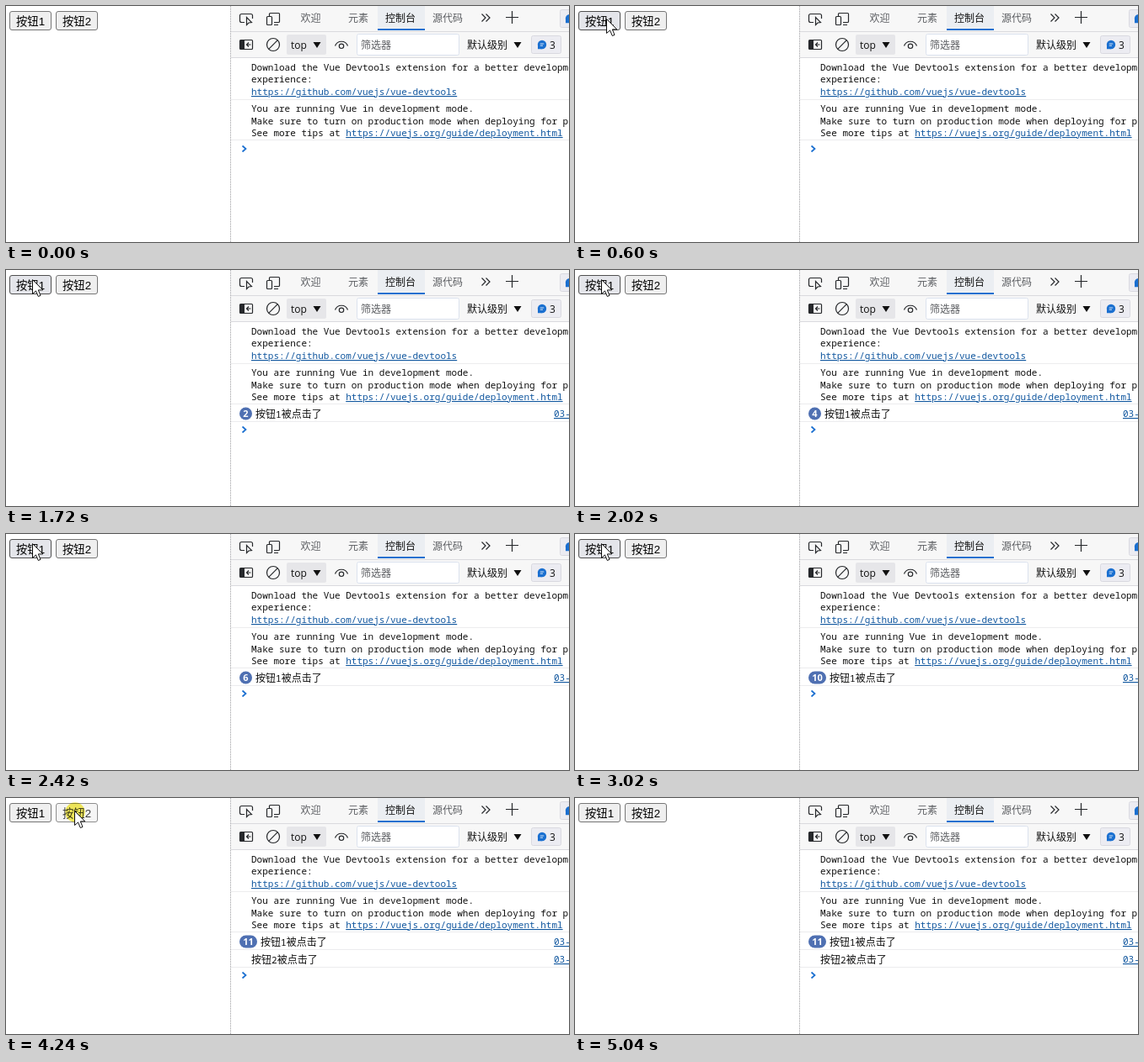
These frames come from a looping animation (668x281 px, 5.66 s). An HTML page:

```html
<!DOCTYPE html>
<html lang="zh-CN">
<head>
<meta charset="utf-8">
<title>Click counter</title>
<style>
html, body { margin: 0; width: 100%; height: 100%; overflow: hidden; background: #fff; }
svg { display: block; }
text { font: 12px "Open Sans", "Noto Sans CJK SC", "Noto Sans CJK", sans-serif; fill: #101010; white-space: pre; }
.mono, .mono text { font: 11px "Noto Sans Mono", "DejaVu Sans Mono", monospace; }
.cjk { font: 12px "Noto Sans CJK SC", "Noto Sans CJK", sans-serif; }
.dim { fill: #5c5e62; }
.link { fill: #11579f; text-decoration: underline; }
.icon { fill: none; stroke: #26282b; stroke-width: 1.2; }
.rule { stroke: #ececee; }
.btn rect { fill: #efefef; stroke: #767676; }
.btn text { font: 13.333px "Liberation Sans", "Noto Sans CJK SC", "Noto Sans CJK", sans-serif; fill: #000; }
.btn.hover rect { fill: #e4e5ea; stroke: #4f4f4f; }
.btn.active rect { fill: #f5f5f5; stroke: #8d8d8d; }
.btn.active text { fill: #3c3c3c; }
#badge text { font: bold 11px "Open Sans", sans-serif; fill: #fff; text-anchor: middle; }
#glow { fill: #f6ec3f; fill-opacity: .85; mix-blend-mode: multiply; }
</style>
</head>
<body>
<svg width="668" height="281" viewBox="0 0 668 281">
  <g class="btn" id="btn1"><rect x="4.5" y="6.5" width="49" height="22" rx="2.5"/><text x="12" y="22.5">按钮1</text></g>
  <g class="btn" id="btn2"><rect x="59.5" y="6.5" width="49" height="22" rx="2.5"/><text x="67" y="22.5">按钮2</text></g>

  <!-- Toolbars -->
  <rect x="267" width="401" height="62" fill="#f7f7f7"/>
  <path d="M266.5 0V281" stroke="#9a9a9e" stroke-dasharray="1 1"/>
  <path d="M267 30.5H668M267 61.5H668" stroke="#dadade"/>
  <rect x="441" width="56" height="29" fill="#ebeef2"/>
  <rect x="441" y="27" width="56" height="2" fill="#1a6fd0"/>
  <text class="dim cjk" x="349.5" y="18.5">欢迎</text>
  <text class="dim cjk" x="406" y="18.5">元素</text>
  <text class="cjk" x="450" y="18.5">控制台</text>
  <text class="dim cjk" x="506" y="18.5">源代码</text>
  <g class="icon">
    <path d="M283 19.5H279.5Q277.5 19.5 277.5 17.5V11.5Q277.5 9.5 279.5 9.5H290.5Q292.5 9.5 292.5 11.5V15"/>
    <path d="M285.5 13.5V22.5L288 20L291.5 19.5Z"/>
    <path d="M312.5 12V9.5Q312.5 8.5 313.5 8.5H323.5Q324.5 8.5 324.5 9.5V18.5Q324.5 19.5 323.5 19.5H318M318 22.5H323"/>
    <rect x="309.5" y="12.5" width="6" height="10" rx="1"/>
    <path d="M564.5 9.5L569 14L564.5 18.5M569.5 9.5L574 14L569.5 18.5"/>
    <path d="M593 13.5H608M600.5 6V21"/>
    <rect x="277.5" y="40.5" width="15" height="11" rx="1"/>
    <path d="M290.5 46H286M288 43.5L285.5 46L288 48.5"/>
    <circle cx="317" cy="46" r="7.5"/><path d="M311.7 51.3L322.3 40.7"/>
    <path d="M390.5 47.5C393 40.5 403 40.5 405.5 47.5"/><circle cx="398" cy="47.8" r="2.7"/>
  </g>
  <path d="M278 41H283V52H278Z" fill="#26282b"/>
  <rect x="333" y="34" width="47" height="24" rx="2" fill="#e6e6e9"/>
  <text x="338" y="51">top</text>
  <path d="M364.5 43H373.5L369 50ZM602.5 43H611.5L607 50Z" fill="#101010"/>
  <rect x="416.5" y="33.5" width="121" height="25" rx="2" fill="#fff" stroke="#dbe2ee"/>
  <text class="dim cjk" x="421" y="51">筛选器</text>
  <text class="cjk" x="547" y="51">默认级别</text>
  <g fill="#ececf2" stroke="#d9d9e0">
    <rect x="623.5" y="35.5" width="35" height="21" rx="2"/>
    <rect x="657.5" y="4.5" width="20" height="21" rx="2"/>
  </g>
  <g fill="#1a6fd0">
    <circle cx="636" cy="46" r="5.2"/><path d="M631 46V51.2H636Z"/>
    <circle cx="669" cy="15" r="5.2"/><path d="M664 15V20.2H669Z"/>
  </g>
  <path d="M633.8 45H638.2M633.8 47.2H637" stroke="#fff" stroke-width=".8"/>
  <text x="645" y="50.5">3</text>

  <!-- Console -->
  <g class="mono">
    <text x="291" y="77">Download the Vue Devtools extension for a better development</text>
    <text x="291" y="91">experience:</text>
    <text class="link" x="291" y="106">https://github.com/vuejs/vue-devtools</text>
    <text x="291" y="126">You are running Vue in development mode.</text>
    <text x="291" y="141">Make sure to turn on production mode when deploying for production.</text>
    <text x="291" y="155">See more tips at <tspan class="link">https://vuejs.org/guide/deployment.html</tspan></text>
  </g>
  <path class="rule" d="M267 111.5H668M267 159.5H668"/>
  <g id="log1"></g>
  <g id="log2"></g>
  <g id="badge"><rect x="277" y="163.5" height="15" rx="7.5" fill="#4f70b2"/><text y="175"></text></g>
  <path id="prompt" d="M280.5 -3.5L284.5 0L280.5 3.5" fill="none" stroke="#1a6fd0" stroke-width="1.7"/>

  <!-- Pointer -->
  <g id="pointer">
    <circle id="glow" cy="1" r="11.7"/>
    <path d="M-.5 -.5V16.5L3.5 12.9L6.3 19.5L9 18.4L6.3 11.9H11.8Z" fill="#fff" stroke="#111"/>
  </g>
</svg>
<script>
const LOOP = 5660;
const LOG2_AT = 3840;
const $ = id => document.getElementById(id);

// Time and pointer tip; no tip means hidden
const moves = [
  [0], [200, 284, 261], [300, 222, 190], [400, 140, 108], [500, 70, 44], [600, 38, 16], [700, 32, 12],
  [3340, 39, 14], [3440, 58, 15], [3540, 78, 16], [3640, 82, 16],
  [4740, 76, 50], [4840, 52, 130], [4940, 24, 225], [5040]
];
const presses = [
  [1200, 1300], [1620, 1720], [1820, 1920], [2120, 2220], [2320, 2420], [2920, 3020], [3140, 3240],
  [3740, 3840], [4040, 4140], [4240, 4340], [4440, 4540]
];
const counts = [1300, 1720, 1920, 2020, 2220, 2420, 2520, 2720, 2920, 3020, 3240];
const firstPresses = [1200, 3740];

function fillLog(id, y, n) {
  $(id).innerHTML =
    `<text class="cjk" x="291" y="${y}">按钮<tspan class="mono">${n}</tspan>被点击了</text>` +
    `<text class="mono link" x="650" y="${y - 1}">03-once.html</text>` +
    `<path class="rule" d="M267 ${y + 4.5}H668"/>`;
}
fillLog("log1", 176, 1);
fillLog("log2", 197, 2);

const show = (id, on) => $(id).setAttribute("visibility", on ? "visible" : "hidden");

function setButton(id, left, x, y, active) {
  const over = x >= left && x < left + 50 && y >= 6 && y < 29;
  $(id).setAttribute("class", "btn" + (over ? active ? " active" : " hover" : ""));
}

function draw(t) {
  const [, x, y] = moves.findLast(m => m[0] <= t);
  const press = presses.find(([from, to]) => t >= from && t < to);
  const active = press && !firstPresses.includes(press[0]);
  show("pointer", x !== undefined);
  // Translate by x and y attributes keeps the glow blending with the page
  if (x !== undefined) $("pointer").setAttribute("transform", `translate(${x} ${y})`);
  $("glow").setAttribute("display", press ? "inline" : "none");
  setButton("btn1", 4, x, y, active);
  setButton("btn2", 59, x, y, active);

  const count = counts.filter(c => c <= t).length;
  const second = t >= LOG2_AT;
  const wide = count > 9;
  show("log1", count > 0);
  show("log2", second);
  show("badge", count > 1);
  const [pill, label] = $("badge").children;
  pill.setAttribute("width", wide ? 21 : 15);
  label.setAttribute("x", wide ? 287.5 : 284.5);
  label.textContent = count;
  $("log1").firstChild.setAttribute("x", count < 2 ? 291 : wide ? 302 : 296);
  $("prompt").setAttribute("transform", `translate(0 ${second ? 211 : count ? 190 : 170})`);
}

const start = performance.now();
function tick() {
  draw((performance.now() - start) % LOOP);
  requestAnimationFrame(tick);
}
tick();
</script>
</body>
</html>
```
